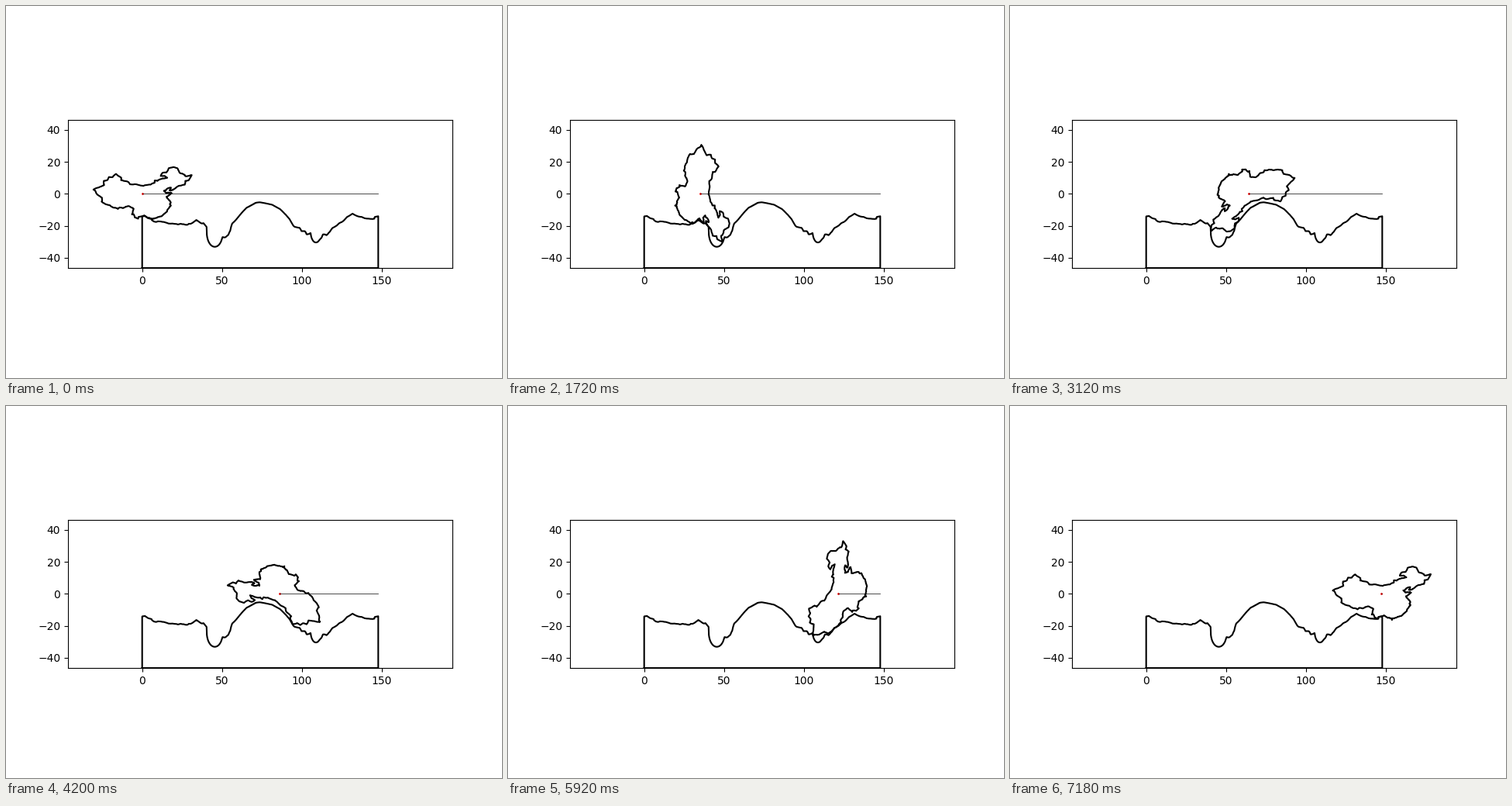
Animation of 640x480 px, one loop 7.2 s. Source, as a matplotlib script:

```python
import numpy as np
import matplotlib.pyplot as plt
from matplotlib.animation import FuncAnimation

FRAMES = 360
LENGTH = 147.7
MARGIN = 46.4
CENTER = np.array([104.0, 36.75])
rng = np.random.default_rng(4)

# Key corners in degrees (longitude, latitude), clockwise from the west
NORTH = [
    (73.7, 39.4), (76.9, 40.8), (80.2, 42.2), (80, 44.9), (82.4, 45.5),
    (83.2, 47.3), (85.5, 47.2), (87.7, 49.2), (90.9, 46.9), (90.8, 45.3),
    (95.3, 44.2), (96.4, 42.7), (100.8, 42.6), (104.7, 41.7), (109.2, 42.5),
    (111.8, 43.7), (111.8, 45.1), (113.5, 44.8), (116.7, 46.4), (119.7, 46.8),
    (118, 48), (115.6, 47.9), (116.7, 49.9), (119.3, 50.2), (120.6, 52.8),
    (123.6, 53.5), (126, 52.8), (127.7, 49.7), (130.6, 48.7), (131, 47.8),
    (135, 48.5), (133.1, 45.2), (131, 44.9), (130.7, 42.5), (126.9, 41.8)]
COAST = [
    (124.3, 39.9), (121.1, 38.9), (122, 40.7), (119.6, 39.9), (117.6, 38.7),
    (118.9, 37.3), (122.5, 37.2), (119.2, 35), (121.9, 31.4), (121.3, 30.4),
    (122, 29.5), (119.6, 25.7), (116.8, 23.2), (114, 22.3), (110.8, 21.4),
    (110.2, 20.3), (109.7, 21.4)]
SOUTH = [
    (107.5, 21.7), (105.3, 23.3), (101.8, 22.4), (101.5, 21.2), (99.3, 22.1),
    (98.7, 24), (97.6, 23.9), (98.7, 27.4), (95.4, 29.1), (92.1, 27.8),
    (89.7, 28.2), (88.8, 27.3), (85.8, 28.2), (81.3, 30.2), (78.6, 31.9),
    (78.9, 34.3), (76, 36.2), (74.9, 38.3)]


def roughen(pts, amp, rounds):
    """Split every edge and push the new corners sideways."""
    pts = np.asarray(pts, float)
    for _ in range(rounds):
        step = np.diff(pts, axis=0)
        side = np.column_stack([-step[:, 1], step[:, 0]])
        mid = (pts[:-1] + pts[1:]) / 2
        mid += side * rng.uniform(-amp, amp, (len(mid), 1))
        out = np.empty((2 * len(pts) - 1, 2))
        out[::2], out[1::2] = pts, mid
        pts = out
    return pts


def build_outline():
    ring = np.vstack([
        roughen(NORTH + COAST[:1], 0.08, 3)[:-1],
        roughen(COAST + SOUTH[:1], 0.16, 4)[:-1],
        roughen(SOUTH + NORTH[:1], 0.1, 3)])
    return ring - CENTER


def pose(pts, k):
    """Roll the points clockwise, k frames along the path."""
    a = -2 * np.pi * k / FRAMES
    c, s = np.cos(a), np.sin(a)
    x, y = pts.T
    return c * x - s * y + LENGTH * k / FRAMES, s * x + c * y


def carve(pts, n=800):
    """Lowest height reached by the rolling outline above each ground point."""
    d = np.r_[0, np.cumsum(np.hypot(*np.diff(pts, axis=0).T))]
    t = np.linspace(0, d[-1], 4000)
    dense = np.column_stack([np.interp(t, d, col) for col in pts.T])
    low = np.zeros(n)
    for k in range(FRAMES + 1):
        x, y = pose(dense, k)
        i = np.rint(x / LENGTH * (n - 1)).astype(int)
        ok = (i >= 0) & (i < n)
        np.minimum.at(low, i[ok], y[ok])
    return np.linspace(0, LENGTH, n), low


outline = build_outline()
road_x, road_y = carve(outline)

fig, ax = plt.subplots(figsize=(6.4, 4.8), dpi=100)
ax.set_aspect("equal")
ax.set_xlim(-MARGIN, LENGTH + MARGIN)
ax.set_ylim(-MARGIN, MARGIN)

ax.plot(np.r_[0, road_x, LENGTH, 0],
        np.r_[-MARGIN, road_y, -MARGIN, -MARGIN], "k", lw=1.5)
shape, = ax.plot([], [], "k", lw=1.5)
hub, = ax.plot([], [], "ro", ms=2, mew=0)
track, = ax.plot([], [], "k", lw=0.5)


def update(k):
    x = LENGTH * k / FRAMES
    shape.set_data(*pose(outline, k))
    hub.set_data([x], [0])
    track.set_data([x, LENGTH], [0, 0])
    return shape, hub, track


anim = FuncAnimation(fig, update, frames=FRAMES, interval=20,
                     repeat=True, repeat_delay=0)
plt.show()
```
